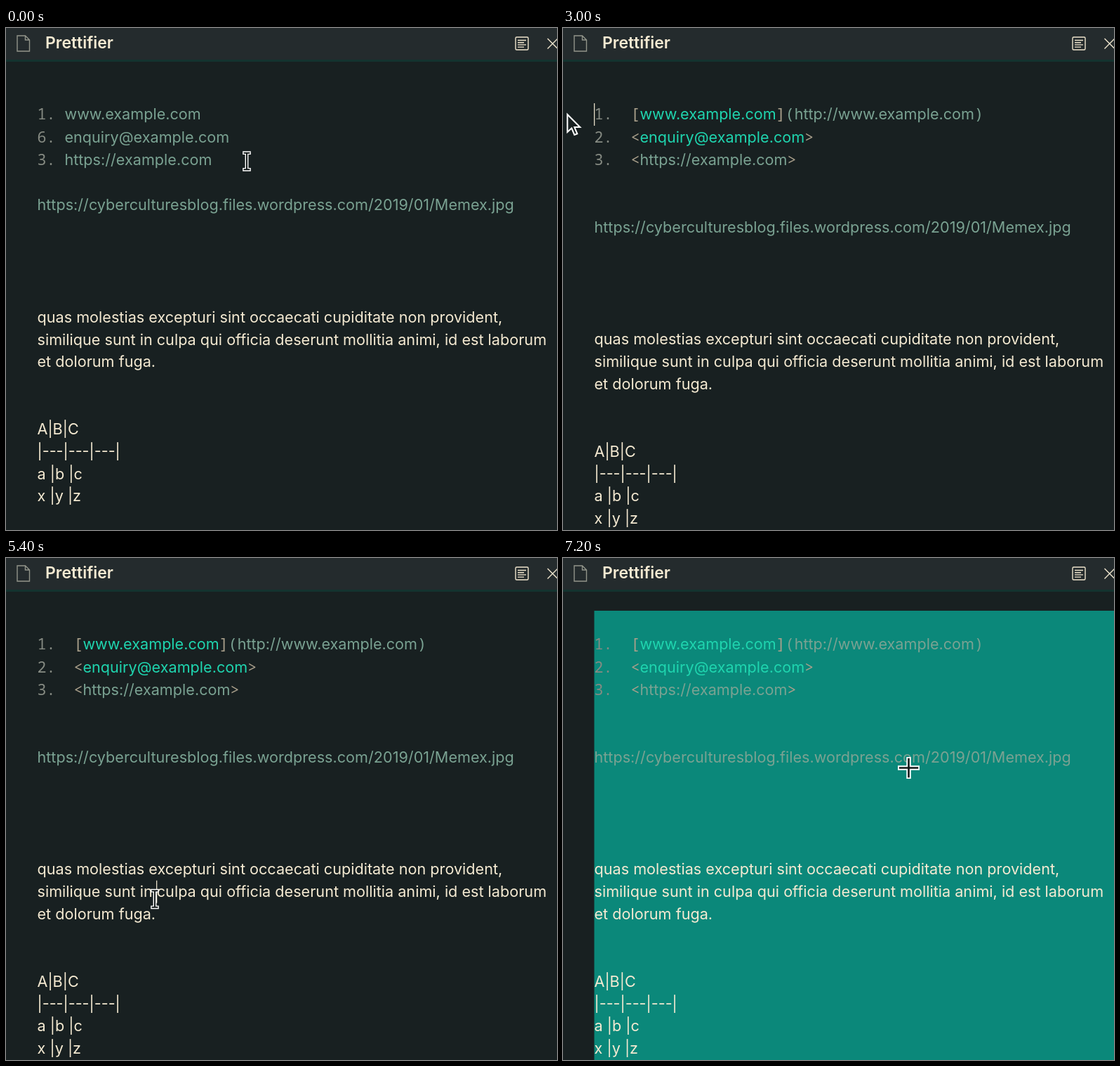
These frames come from a looping animation (785 px wide and 714 px high, 8 s). An HTML page:

```html
<!DOCTYPE html>
<html lang="en">
<head>
<meta charset="utf-8">
<title>Prettifier</title>
<style>
  html, body { margin: 0; width: 100%; height: 100%; overflow: hidden; background: #182021; }
  svg { display: block; }
  text { font: 400 21.64px Inter, sans-serif; font-optical-sizing: none; fill: #f5ead2; white-space: pre; }
  .title { font-weight: 600; font-size: 23px; }
  .mono { font-family: "Noto Sans Mono", monospace; }
  .num { fill: #868b83; }
  .mark { fill: #a99f8b; }
  .url { fill: #7aa292; }
  .link { fill: #1fd5af; }
  .icon { fill: none; stroke: #efe5cd; stroke-width: 1.4; }
  .outer { fill: none; stroke: #fff; }
  .inner { fill: none; stroke: #121818; }
</style>
</head>
<body>
<svg id="stage" width="785" height="714" viewBox="0 0 785 714">
  <rect width="785" height="714" fill="#182021"/>
  <rect width="785" height="46" fill="#242b2d"/>
  <rect y="45" width="785" height="3" fill="#14332f"/>
  <path class="icon" style="stroke:#92958a" d="M16 11H27.5L33.5 17V33H16ZM27.5 11V17H33.5"/>
  <text class="title" x="56" y="29.3">Prettifier</text>
  <rect class="icon" x="726" y="13" width="18" height="18" rx="1.5"/>
  <path class="icon" d="M729 17.5H741M729 20.7H738M729 23.9H741M729 27.1H738"/>
  <path class="icon" d="M771.5 15L786 29.5M771.5 29.5L786 15"/>

  <path id="selection" fill="#0b887a"/>
  <g id="raw"></g>
  <g id="pretty"></g>
  <g id="body"></g>
  <rect id="caret" width="1.3" height="32" fill="#e6ddc8"/>

  <g id="ibeam">
    <path class="outer" stroke-width="4.8" stroke-linecap="square" d="M-3.4 -11.8H3.4M0 -11.8V11.8M-3.4 11.8H3.4"/>
    <path class="inner" stroke-width="2" d="M-4.4 -11.8H4.4M0 -11.8V11.8M-4.4 11.8H4.4"/>
  </g>
  <path id="arrow" fill="#182021" stroke="#fff" stroke-width="2"
    d="M0 0V25L6 19.5L10 29L14 27.5L10 18H18Z"/>
  <g id="cross">
    <path class="outer" stroke-width="6.4" d="M-15.5 0H15.5M0 -15.5V15.5"/>
    <path class="inner" stroke-width="2.6" d="M-13.7 0H13.7M0 -13.7V13.7"/>
  </g>
</svg>
<script>
const LOOP = 8000, LEFT = 44.5, ROW = 31.85;
const $ = id => document.getElementById(id);
const NS = "http://www.w3.org/2000/svg";

// Each run is [class, text]; runs flow one after another.
function addLine(group, y, ...runs) {
  const line = document.createElementNS(NS, "text");
  line.setAttribute("x", LEFT);
  line.setAttribute("y", y);
  for (const [cls, content] of runs) {
    const span = document.createElementNS(NS, "tspan");
    span.setAttribute("class", cls);
    span.textContent = content;
    line.append(span);
  }
  $(group).append(line);
}

const num = s => ["mono num", s];
const mark = s => ["mono mark", s];
const url = s => ["url", s];
const link = s => ["link", s];
const listY = i => 130.3 + 32.5 * i;
const site = "www.example.com", mail = "enquiry@example.com", page = "https://example.com";

addLine("raw", listY(0), num("1. "), url(site));
addLine("raw", listY(1), num("6. "), url(mail));
addLine("raw", listY(2), num("3. "), url(page));

addLine("pretty", listY(0), num("1.  "), mark("["), link(site), mark("]"),
  ["mono url", "("], url("http://" + site), ["mono url", ")"]);
addLine("pretty", listY(1), num("2.  "), mark("<"), link(mail), mark(">"));
addLine("pretty", listY(2), num("3.  "), mark("<"), url(page), mark(">"));

const bodyLines = [
  [0, "https://cyberculturesblog.files.wordpress.com/2019/01/Memex.jpg", "url"],
  [5, "quas molestias excepturi sint occaecati cupiditate non provident,"],
  [6, "similique sunt in culpa qui officia deserunt mollitia animi, id est laborum"],
  [7, "et dolorum fuga."],
  [10, "A|B|C"],
  [11, "|---|---|---|"],
  [12, "a |b |c"],
  [13, "x |y |z"]
];
for (const [row, content, cls = ""] of bodyLines) addLine("body", 259.4 + ROW * row, [cls, content]);

const selections = {
  none: "",
  lower: "M44.5 139.5H785V172H294V204.5H44.5Z",
  list: "M44.5 107H785V172H294V204.5H44.5Z",
  all: "M44.5 75H785V714H44.5Z"
};
const carets = { top: [44, 75], first: [44, 107], word: [214, 458.7] };

// Start time, pointer, x, y, caret, selection
const steps = [
  [0, "ibeam", 343, 189.5],
  [400, "ibeam", 343, 189.5, "top"],
  [600, "ibeam", 252, 181.5, "", "lower"],
  [800, "ibeam", 141.5, 170.5, "", "list"],
  [1200, "arrow", 6.3, 123, "", "list"],
  [3000, "arrow", 6.3, 123, "first"],
  [3400, "arrow", 6.3, 123],
  [3600, "arrow", 168.5, 104.5],
  [3800, "ibeam", 196, 120],
  [4200, "ibeam", 340, 579.5, "first"],
  [4400, "ibeam", 231, 704, "first"],
  [4800, "ibeam", 207, 687],
  [5000, "ibeam", 201, 598, "first"],
  [5400, "ibeam", 212, 485, "word"],
  [5800, "ibeam", 212, 485],
  [6200, "ibeam", 293, 401],
  [6400, "ibeam", 493, 298, "word"],
  [6600, "ibeam", 493, 298, "", "all"],
  [7200, "cross", 492.5, 298.5, "", "all"]
];

const show = (id, on) => $(id).setAttribute("visibility", on ? "visible" : "hidden");

function render(t) {
  const [, pointer, x, y, caret, selection = "none"] = steps.findLast(s => s[0] <= t);
  const formatted = t >= 3000;
  show("raw", !formatted);
  show("pretty", formatted);
  $("body").setAttribute("transform", `translate(0 ${formatted ? ROW : 0})`);
  $("selection").setAttribute("d", selections[selection]);
  for (const id of ["ibeam", "arrow", "cross"]) show(id, id === pointer);
  $(pointer).setAttribute("transform", `translate(${x} ${y})`);
  show("caret", caret);
  if (caret) {
    $("caret").setAttribute("x", carets[caret][0]);
    $("caret").setAttribute("y", carets[caret][1]);
  }
}

const start = performance.now();
function tick() {
  render((performance.now() - start) % LOOP);
  requestAnimationFrame(tick);
}
tick();
</script>
</body>
</html>
```
